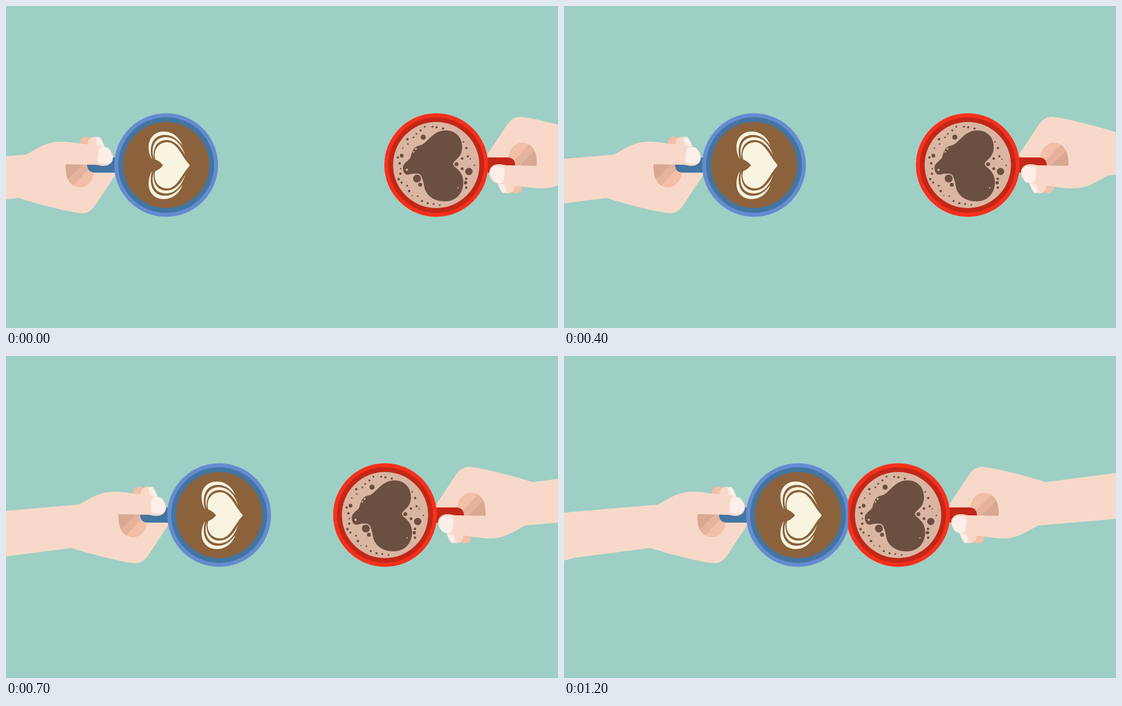
These frames come from a looping animation (979x572 px, 1300 ms). An HTML page:

```html
<!DOCTYPE html>
<html lang="en">
<head>
<meta charset="utf-8">
<title>Coffee cups</title>
<style>
html, body { margin: 0; width: 100%; height: 100%; overflow: hidden; background: #9ecfc4; }
svg { display: block; width: 979px; height: 572px; }
</style>
</head>
<body>
<svg viewBox="0 0 979 572">
  <defs>
    <!-- the cups meet on the line x = 504 -->
    <clipPath id="leftSide"><rect width="504" height="572"/></clipPath>
    <clipPath id="rightSide"><rect x="504" width="475" height="572"/></clipPath>
    <clipPath id="palm"><path d="M106 281H156V296C154 312 144 322 131 322C116 322 104 309 106 281Z"/></clipPath>
    <g id="hand">
      <path fill="#f3bfa6" d="M131 246C130 238 136 232 142 232C148 232 152 236 154 248Z"/>
      <path fill="#f8d9c9" d="M145 246C144 237 151 232 159 232C166 233 172 244 175 254L165 260Z"/>
      <path fill="#fdeeea" d="M159 237C160 233 164 231 167 234C171 239 174 246 175 252C170 253 164 251 162 247Z"/>
      <path fill="#f8d9c9" d="M-140 279L35 264C55 254 70 241 98 241C118 241 132 246 163 247L186 262L194 290V300L161 350C153 362 147 368 135 368C118 367 70 356 22 341L-113 358.5L-140 366Z"/>
      <g clip-path="url(#palm)">
        <path fill="#f3bfa6" d="M100 275H160V325H100Z"/>
        <path fill="#e5b39b" d="M100 275H160L118 320L100 325Z"/>
        <path fill="#d8a893" d="M100 275H143L109 309L100 325Z"/>
      </g>
      <path fill="currentColor" d="M144 282V269H198V296H158C149 296 144 291 144 282Z"/>
      <path fill="#f8d9c9" d="M107 281V262L140 246L162 247C176 249 190 257 190 268C190 278 183 284 173 284C166 284 164 282 157 282Z"/>
      <path fill="#fdeeea" d="M166 253C168 249 178 250 182 253C187 258 189 267 188 273C187 279 181 281 171 280C163 280 162 276 163 269C164 262 163 258 166 253Z"/>
    </g>
    <g id="halfHeart" fill="#f8f4e0">
      <path d="M259 273C246 250 254 223 280 223C296 223 308 234 313 248C304 236 294 228 280 229C262 230 252 247 259 273Z"/>
      <path d="M262 272C256 250 264 233 284 233C300 233 312 247 318 266C309 248 298 238 284 238C266 239 260 254 262 272Z"/>
      <path d="M279 283.5C275 278 269 274 265 273C260 258 269 242 286 242C304 242 311 267 326 282.5L321 283.5Z"/>
    </g>
  </defs>

  <g clip-path="url(#leftSide)"><g id="blue" color="#4275a2">
    <use href="#hand"/>
    <circle cx="284" cy="282.5" r="92" fill="#668bd0"/>
    <circle cx="284" cy="282.5" r="85" fill="#4275a2"/>
    <circle cx="284" cy="282.5" r="76.5" fill="#8b623c"/>
    <use href="#halfHeart"/>
    <use href="#halfHeart" transform="translate(0 566) scale(1 -1)"/>
  </g></g>

  <g clip-path="url(#rightSide)"><g id="red" color="#c22718">
    <use href="#hand" transform="rotate(180 523.5 282.5)"/>
    <circle cx="763" cy="282.5" r="92" fill="#f7301c"/>
    <circle cx="763" cy="282.5" r="85" fill="#c22718"/>
    <circle cx="763" cy="282.5" r="76.5" fill="#d9b5a2"/>
    <g fill="#6b4f40">
      <path d="M704 287C704 280 712 276 717 270C720 260 722 250 733 248C747 246 755 221 780 221C798 221 809 234 809 250C809 270 796 272 793 280C793 287 811 291 811 313C811 334 797 347 778 347C758 347 745 336 742 322C740 310 738 299 728 298C718 297 715 301 709 299C705 296 704 291 704 287Z"/>
      <g stroke="#d9b5a2" stroke-width="2">
        <circle cx="729" cy="306.5" r="8"/>
        <circle cx="799" cy="281" r="4.5"/>
      </g>
      <circle cx="740" cy="233" r="4.5"/>
      <circle cx="821" cy="294" r="6.5"/>
      <circle cx="702" cy="266" r="3.2"/>
      <circle cx="734.5" cy="317.5" r="3.5"/>
      <circle cx="815" cy="314" r="3"/>
      <circle cx="809" cy="271" r="2.2"/>
      <circle cx="809" cy="289" r="2.5"/>
      <g id="foam"/>
    </g>
    <g fill="#d9b5a2">
      <circle cx="727" cy="254" r="1.8"/>
      <circle cx="723" cy="259" r="1.5"/>
      <circle cx="711" cy="291" r="2"/>
      <circle cx="802" cy="323" r="1.2"/>
    </g>
  </g></g>
</svg>
<script>
const el = id => document.getElementById(id);

let seed = 7;
const random = () => (seed = seed * 16807 % 2147483647) / 2147483647;

// small bubbles spread along an arc of the foam, angles in degrees
function arc(count, from, to, near, far) {
  let dots = '';
  for (let i = 0; i < count; i++) {
    const angle = (from + (to - from) * (i + random() * 0.6) / count) * Math.PI / 180;
    const dist = near + (far - near) * random();
    const x = 763 + dist * Math.cos(angle), y = 282.5 + dist * Math.sin(angle);
    dots += `<circle cx="${x}" cy="${y}" r="${1 + 1.3 * random()}"/>`;
  }
  return dots;
}
el('foam').innerHTML = arc(25, 85, 284, 62, 72) + arc(8, -42, 42, 57, 68);

// key points: step, x, y; a step lasts 100 ms
const bluePath = [[0, 0, 0], [2, 26, 0], [3, 39, -2], [4, 53, 0], [6, 78, 0], [7, 94, 0], [9, 110.5, 0], [12, 131, 0]];
const redPath = [[0, 0, 0], [3, -33, 0], [6, -74.5, 0], [9, -123.5, 0], [12, -170.5, 0]];

function move(id, path, step) {
  const next = Math.max(1, path.findIndex(key => key[0] >= step));
  const [t0, x0, y0] = path[next - 1], [t1, x1, y1] = path[next];
  const k = (step - t0) / (t1 - t0);
  el(id).setAttribute('transform', `translate(${x0 + (x1 - x0) * k} ${y0 + (y1 - y0) * k})`);
}

const start = performance.now();
function tick() {
  const step = Math.floor((performance.now() - start) % 1300 / 100);
  move('blue', bluePath, step);
  move('red', redPath, step);
  requestAnimationFrame(tick);
}
tick();
</script>
</body>
</html>
```
